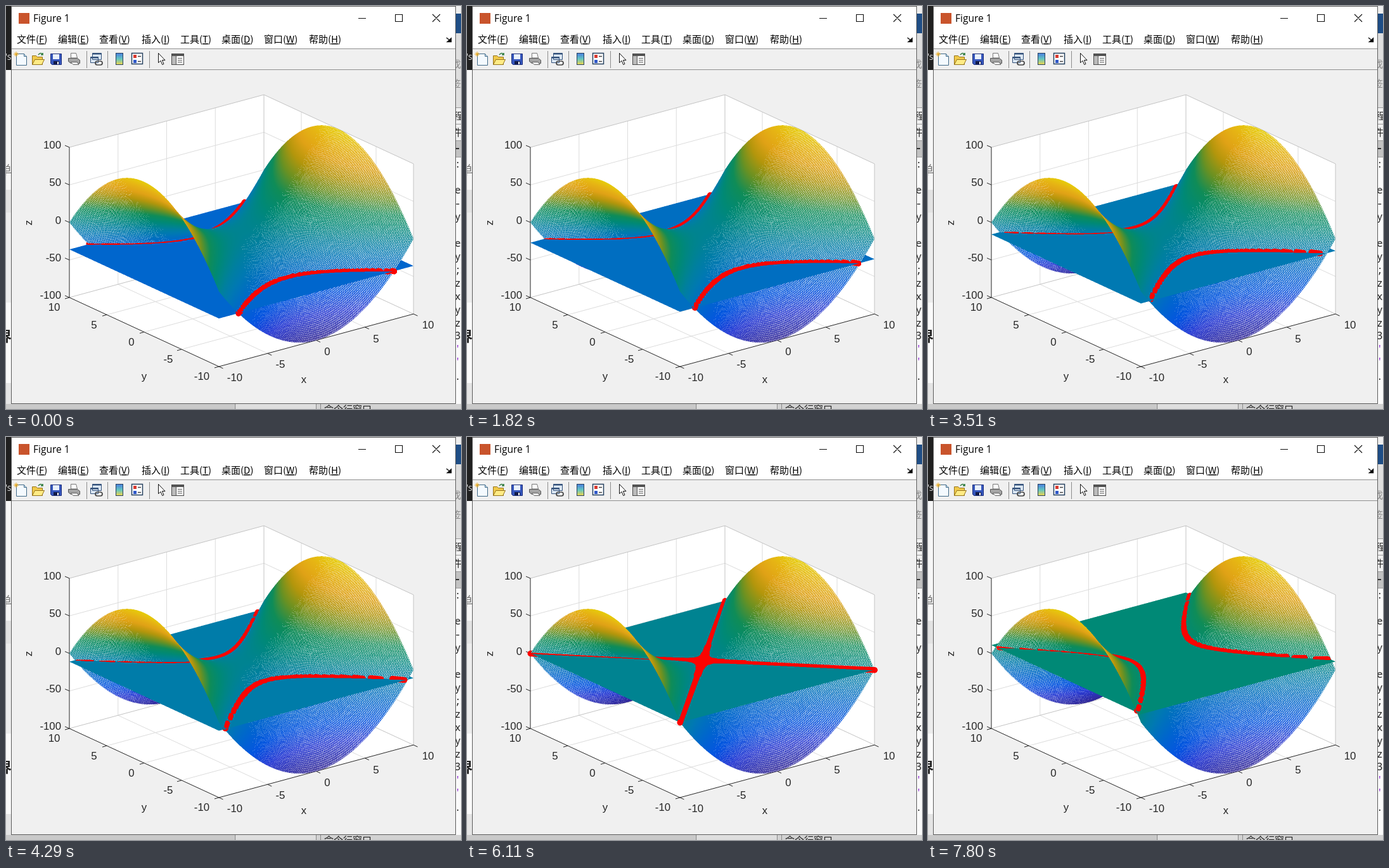
These frames come from a looping animation (718x636 px, 8 s). An HTML page with a canvas:

```html
<!DOCTYPE html>
<html lang="zh-CN">
<head>
<meta charset="utf-8">
<title>Figure 1</title>
<style>
html, body { margin: 0; width: 100%; height: 100%; overflow: hidden; background: #fff; }
svg { position: absolute; left: 0; top: 0; }
canvas { position: absolute; left: 90px; top: 180px; width: 564px; height: 360px; }
.ui { font-family: "Open Sans", "Noto Sans", sans-serif; }
.cjk { font-family: "Noto Sans CJK SC", "Noto Sans CJK", sans-serif; }
.mono { font-family: "Noto Sans Mono", monospace; font-size: 16px; }
.num { font-family: "Liberation Sans", Arial, sans-serif; font-size: 16.8px; fill: #262626; }
</style>
</head>
<body>
<svg width="718" height="636" viewBox="0 0 718 636">
  <!-- desktop behind the window -->
  <g id="behind">
    <rect width="718" height="636" fill="#fafafa"/>
    <rect width="10" height="101" fill="#202020"/>
    <rect y="102" width="9" height="188" fill="#f6f6f6"/>
    <rect y="290" width="9" height="36" fill="#e2e2e2"/>
    <rect y="326" width="9" height="142" fill="#ececec"/>
    <rect y="595" width="9" height="41" fill="#e4e4e4"/>
    <text x="-1" y="85" class="ui" font-size="14" fill="#ddd">'s</text>
    <text x="-10" y="266" class="cjk" font-size="19" fill="#777">单</text>
    <text x="-13" y="529" class="cjk" font-size="22" font-weight="700" fill="#222">界</text>
    <rect x="709" width="9" height="12" fill="#eee"/>
    <rect x="709" y="12" width="9" height="31" fill="#1f4e86"/>
    <rect x="709" y="43" width="9" height="117" fill="#dedede"/>
    <rect x="709" y="160" width="9" height="52" fill="#f0f0f0"/>
    <rect x="709" y="212" width="9" height="26" fill="#c2c2c2"/>
    <path d="M709 160.500h9M709 186.500h9M709 212.500h9M709 238.500h9" stroke="#999"/>
    <text x="703" y="97" class="cjk" font-size="15" fill="#888">找</text>
    <text x="703" y="128" class="cjk" font-size="15" fill="#888">签</text>
    <text x="706" y="179" class="cjk" font-size="15" fill="#222">程</text>
    <text x="704" y="205" class="cjk" font-size="15" fill="#222">件</text>
    <path d="M709 225h6" stroke="#333" stroke-width="2"/>
    <g id="code" class="mono" fill="#222"></g>
    <rect y="628" width="718" height="8" fill="#d2d2d2"/>
    <rect y="628" width="360" height="8" fill="#c9c9c9"/>
    <rect x="363" y="628" width="126" height="8" fill="#dedede"/>
    <path d="M361.500 628v8M489.500 628v8M496.500 628v8" stroke="#888"/>
    <text x="502" y="642" class="cjk" font-size="15" fill="#222">命令行窗口</text>
  </g>
  <!-- window frame -->
  <rect x="8.500" y=".5" width="701" height="627" fill="#f0f0f0" stroke="#5c5c5c"/>
  <rect x="9" y="1" width="700" height="66" fill="#fff"/>
  <path d="M9 67.500h700M9 100.500h700" stroke="#8f8f8f"/>
  <rect x="20" y="11" width="17" height="17" fill="#c9542c"/>
  <text x="43" y="25" class="ui" font-size="15.500">Figure 1</text>
  <path d="M556 19.500h12M614.500 13.500h11v11h-11zM673 13l12 12M685 13l-12 12" fill="none" stroke="#111" stroke-width="1.100"/>
  <g id="menu" class="cjk" font-size="15"></g>
  <path d="M695 50l5 4m2.500-3v5.500h-6z" stroke="#111" stroke-width="1.500"/>
  <!-- toolbar -->
  <path d="M127.500 71v27M160.500 71v27M226.500 71v27" stroke="#8d8d8d"/>
  <g stroke-width="1">
    <path d="M16.500 75.500h12l4 4v14h-16z" fill="#f4faff" stroke="#416a88"/>
    <path d="M28.500 75.500v4h4" fill="#c4dcec" stroke="#416a88"/>
    <path d="M16 72v8M12 76h8M13.500 73.500l5 5M18.500 73.500l-5 5" stroke="#e8a514"/>
    <path d="M41.500 92.500v-14h6l2 2h8v12z" fill="#f0c94a" stroke="#96741c"/>
    <path d="M41.500 92.500l4-8h15l-4 8z" fill="#ffeb85" stroke="#96741c"/>
    <path d="M51 77q4-5 7 0m0-3v3h-3" fill="none" stroke="#2c7a3c" stroke-width="1.500"/>
    <path d="M70.500 75.500h17v17h-15l-2-2z" fill="#3556bd" stroke="#20317b"/>
    <path d="M74 76h10v8H74z" fill="#e8f0fb"/><path d="M75 87h9v5h-9z" fill="#111b48"/><path d="M81 88h2v4h-2z" fill="#fff"/>
    <path d="M102.500 82v-7.500h8l2 7.500z" fill="#fff" stroke="#777"/>
    <path d="M98.500 82.500h14l4 3v5h-14l-4-3z" fill="#a5a5a5" stroke="#555"/>
    <path d="M102 88.500h10l3 4h-9z" fill="#eee" stroke="#666"/>
    <path d="M136.500 74.500h14v10h-14zM133.500 80.500h12v9h-12z" fill="#dce8f4" stroke="#33517a"/>
    <path d="M136.500 75.500h14M133.500 81.500h12" stroke="#33517a" stroke-width="2"/>
    <path d="M141 90q0-3 3-3h5q3 0 3 3t-3 3h-5q-3 0-3-3z" fill="none" stroke="#444" stroke-width="1.700"/>
    <rect x="173.500" y="74.500" width="11" height="18" fill="url(#bar)" stroke="#27425f"/>
    <rect x="198.500" y="74.500" width="17" height="17" fill="#fff" stroke="#27425f" stroke-width="1.500"/>
    <path d="M201 77h5v5h-5z" fill="#d83a30"/><path d="M201 85h5v5h-5z" fill="#3159c8"/>
    <path d="M208 79.500h5M208 87.500h5" stroke="#444" stroke-width="1.500"/>
    <path d="M240.500 74.500v15l3.500-3.200 2.700 6.200 2.300-1-2.600-6h4.600z" fill="#fff" stroke="#111"/>
    <rect x="261.500" y="75.500" width="19" height="17" fill="#fff" stroke="#4a4a4a"/>
    <path d="M262 77.500h18" stroke="#555" stroke-width="3"/>
    <path d="M262 79h6v13h-6z" fill="#bbb"/>
    <path d="M268.500 79v13M271 82.500h7M271 85.500h7M271 88.500h7" stroke="#555"/>
  </g>
  <defs><linearGradient id="bar" x1="0" y1="0" x2="0" y2="1">
    <stop offset="0" stop-color="#4a7fe0"/><stop offset=".5" stop-color="#62c5c0"/><stop offset="1" stop-color="#f2d64a"/>
  </linearGradient></defs>
  <g id="axes"></g>
</svg>
<canvas id="plot" width="1128" height="720"></canvas>
<script>
const $ = id => document.getElementById(id);
function add(parent, tag, attrs, text) {
  const el = document.createElementNS("http://www.w3.org/2000/svg", tag);
  for (const k in attrs) el.setAttribute(k, attrs[k]);
  if (text) el.textContent = text;
  parent.append(el);
  return el;
}

[["文件", "F", 17], ["编辑", "E", 82], ["查看", "V", 147], ["插入", "I", 214],
 ["工具", "T", 275], ["桌面", "D", 340], ["窗口", "W", 407], ["帮助", "H", 478]].forEach(([word, key, x]) => {
  const el = add($("menu"), "text", { x, y: 58 });
  el.innerHTML = `${word}(<tspan text-decoration="underline">${key}</tspan>)`;
});

[[":", 255], ["e", 296], ["-", 317], ["y", 338], ["e", 380], ["y", 401], [";", 422], ["z", 443],
 ["x", 464], ["y", 485], ["z", 506], ["3", 526], ["'", 547], ["'", 567], [".", 590]].forEach(([s, y]) =>
  add($("code"), "text", { x: 708, y, fill: s === "'" ? "#8a20d0" : "#222" }, s));

// Affine projection: pixels per unit of x, y and z
const XX = 15.35, XY = 4.15, YX = 11.8, YY = 5.45, ZY = 1.185;
const project = (x, y, z) => [
  336 + XX * (x + 10) - YX * (y + 10),
  569 - XY * (x + 10) - YY * (y + 10) - ZY * (z + 100)
];
const path = (...pts) => "M" + pts.map(p => project(...p).map(v => v.toFixed(1)).join(" ")).join("L");

function drawAxes() {
  const g = $("axes");
  const line = (stroke, ...pts) => add(g, "path", { d: path(...pts), fill: "none", stroke });
  const label = (s, x, y, anchor = "middle") =>
    add(g, "text", { x, y: y + 6, class: "num", "text-anchor": anchor }, s);
  const grid = "#dcdcdc", edge = "#c3c3c3", dark = "#262626";

  add(g, "path", { fill: "#fff", d: path([-10, -10, -100], [10, -10, -100], [10, -10, 100],
    [10, 10, 100], [-10, 10, 100], [-10, 10, -100]) + "z" });
  for (const v of [-5, 0, 5]) {
    line(grid, [v, -10, -100], [v, 10, -100], [v, 10, 100]);
    line(grid, [-10, v, -100], [10, v, -100], [10, v, 100]);
    line(grid, [-10, 10, v * 10], [10, 10, v * 10], [10, -10, v * 10]);
  }
  line(edge, [-10, 10, 100], [10, 10, 100], [10, -10, 100], [10, -10, -100]);
  line(edge, [-10, 10, -100], [10, 10, -100], [10, -10, -100]);
  line(edge, [10, 10, -100], [10, 10, 100]);
  line(dark, [-10, 10, 100], [-10, 10, -100], [-10, -10, -100], [10, -10, -100]);

  const xAt = [[361, 586], [433, 565], [507, 545], [584, 525], [666, 503]];
  const yAt = [[309, 584], [256, 557], [198, 530], [139, 503], [76, 475]];
  [-10, -5, 0, 5, 10].forEach((v, i) => {
    const tick = (p, dx, dy) => add(g, "path", { d: `M${p}l${dx} ${dy}`, stroke: dark });
    tick(project(v, -10, -100), 6.5, 3);
    tick(project(-10, v, -100), -7, 2);
    tick(project(-10, 10, v * 10), -7, -3);
    label(String(v), ...xAt[i]);
    label(String(v), ...yAt[i]);
    label(String(v * 10), 87, 456 - i * 59.25, "end");
  });
  label("x", 470, 589);
  label("y", 218, 584);
  add(g, "text", { transform: "translate(41 342) rotate(-90)", class: "num", "text-anchor": "middle" }, "z");
}

// Colour by height: z, r, g, b
const STOPS = [
  [-100, 50, 40, 150], [-75, 42, 60, 212], [-55, 5, 86, 224], [-36, 0, 102, 205], [-23, 0, 114, 188],
  [-16, 0, 121, 178], [-6, 0, 127, 160], [0, 0, 131, 145], [11, 0, 137, 118], [25, 15, 140, 88],
  [40, 105, 145, 35], [55, 180, 150, 12], [70, 224, 162, 22], [85, 230, 180, 20], [100, 230, 205, 10]
];
const pack = (r, g, b) => (255 << 24 | b << 16 | g << 8 | r) >>> 0;
function colour(z) {
  let i = 1;
  while (i < STOPS.length - 1 && STOPS[i][0] < z) i++;
  const a = STOPS[i - 1], b = STOPS[i];
  const f = Math.min(1, Math.max(0, (z - a[0]) / (b[0] - a[0])));
  const mix = k => Math.round(a[k] + (b[k] - a[k]) * f);
  return pack(mix(1), mix(2), mix(3));
}

const LEFT = 90, TOP = 180, SCALE = 2, W = 1128, H = 720, NONE = -999;
const DET = XX * YY + YX * XY;
const KX = YX * ZY / DET, KY = XX * ZY / DET;
const ctx = $("plot").getContext("2d");
const image = ctx.createImageData(W, H);
const pixels = new Uint32Array(image.data.buffer);
const hitZ = new Float32Array(W * H).fill(NONE);
const seenZ = new Float32Array(W * H);
const meshColour = new Uint32Array(W * H);
const rayX = new Float32Array(W * H), rayY = new Float32Array(W * H);
const inside = (x, y) => Math.abs(x) <= 10 && Math.abs(y) <= 10;

// Mesh lines every 0.1 over white faces
function meshAt(x, y, z) {
  const ax = XX / 10, ay = -(XY + 2 * x * ZY) / 10;
  const bx = -YX / 10, by = -(YY - 2 * y * ZY) / 10;
  const area = Math.abs(ax * by - ay * bx);
  const off = v => Math.abs(v * 10 - Math.round(v * 10));
  const onLine = off(x) * area / Math.hypot(bx, by) < 0.5 || off(y) * area / Math.hypot(ax, ay) < 0.5;
  return onLine ? colour(z) : pack(250, 250, 250);
}

// Nearest point of z = x² - y² along the sight line of each pixel
function traceSurface() {
  const A = KX * KX - KY * KY;
  for (let j = 0, p = 0; j < H; j++) for (let i = 0; i < W; i++, p++) {
    const a = LEFT + (i + 0.5) / SCALE - 336;
    const e = 569 - TOP - (j + 0.5) / SCALE - ZY * 100;
    const x0 = rayX[p] = (YY * a + YX * e) / DET - 10;
    const y0 = rayY[p] = (XX * e - XY * a) / DET - 10;
    const B = 2 * (y0 * KY - x0 * KX) - 1, C = x0 * x0 - y0 * y0;
    const disc = B * B - 4 * A * C;
    if (disc < 0) continue;
    const s = Math.sqrt(disc), r1 = (-B + s) / (2 * A), r2 = (-B - s) / (2 * A);
    for (const z of [Math.max(r1, r2), Math.min(r1, r2)]) {
      const x = x0 - KX * z, y = y0 - KY * z;
      if (!inside(x, y)) continue;
      hitZ[p] = z;
      meshColour[p] = meshAt(x, y, z);
      break;
    }
  }
}

const RED = pack(252, 4, 0), RADIUS = 4.7;
function stamp(x, y, z) {
  const [X, Y] = project(x, y, z);
  const cx = (X - LEFT) * SCALE, cy = (Y - TOP) * SCALE, r = RADIUS * SCALE;
  for (let j = Math.ceil(cy - r); j <= cy + r; j++) {
    const dy = j - cy, half = Math.sqrt(r * r - dy * dy);
    const depth = z - 0.633 * dy / SCALE + 0.3; // the disc faces the viewer
    for (let i = Math.ceil(cx - half); i <= cx + half; i++)
      if (seenZ[j * W + i] <= depth) pixels[j * W + i] = RED;
  }
}

function drawLevel(c) {
  const flat = colour(c);
  for (let p = 0; p < pixels.length; p++) {
    const z = hitZ[p];
    if (z < c && inside(rayX[p] - KX * c, rayY[p] - KY * c)) {
      pixels[p] = flat;
      seenZ[p] = c;
    } else {
      pixels[p] = meshColour[p];
      seenZ[p] = z;
    }
  }
  for (let j = 100; j >= -100; j--) for (let i = 100; i >= -100; i--) {
    const z = (i * i - j * j) / 100;
    if (Math.abs(z - c) <= 0.5) stamp(i / 10, j / 10, z);
  }
  ctx.putImageData(image, 0, 0);
}

// Plane height by step; some steps hold the picture
const LOOP = 8000, STEP = 130;
const HOLDS = [5, 8, 10, 13, 50, 54, 58];
const KEYS = [[0, -36], [7, -34], [18, -23], [27, -16], [39, -6], [47, 0], [60, 11]];
function levelAt(t) {
  let k = Math.min(60, Math.floor(t / STEP));
  if (HOLDS.includes(k)) k--;
  let i = 1;
  while (KEYS[i][0] < k) i++;
  const [k0, v0] = KEYS[i - 1], [k1, v1] = KEYS[i];
  return Math.round(v0 + (v1 - v0) * (k - k0) / (k1 - k0));
}

drawAxes();
traceSurface();
let shown = null;
const start = performance.now();
function tick() {
  const c = levelAt((performance.now() - start) % LOOP);
  if (c !== shown) drawLevel(shown = c);
  requestAnimationFrame(tick);
}
tick();
</script>
</body>
</html>
```
